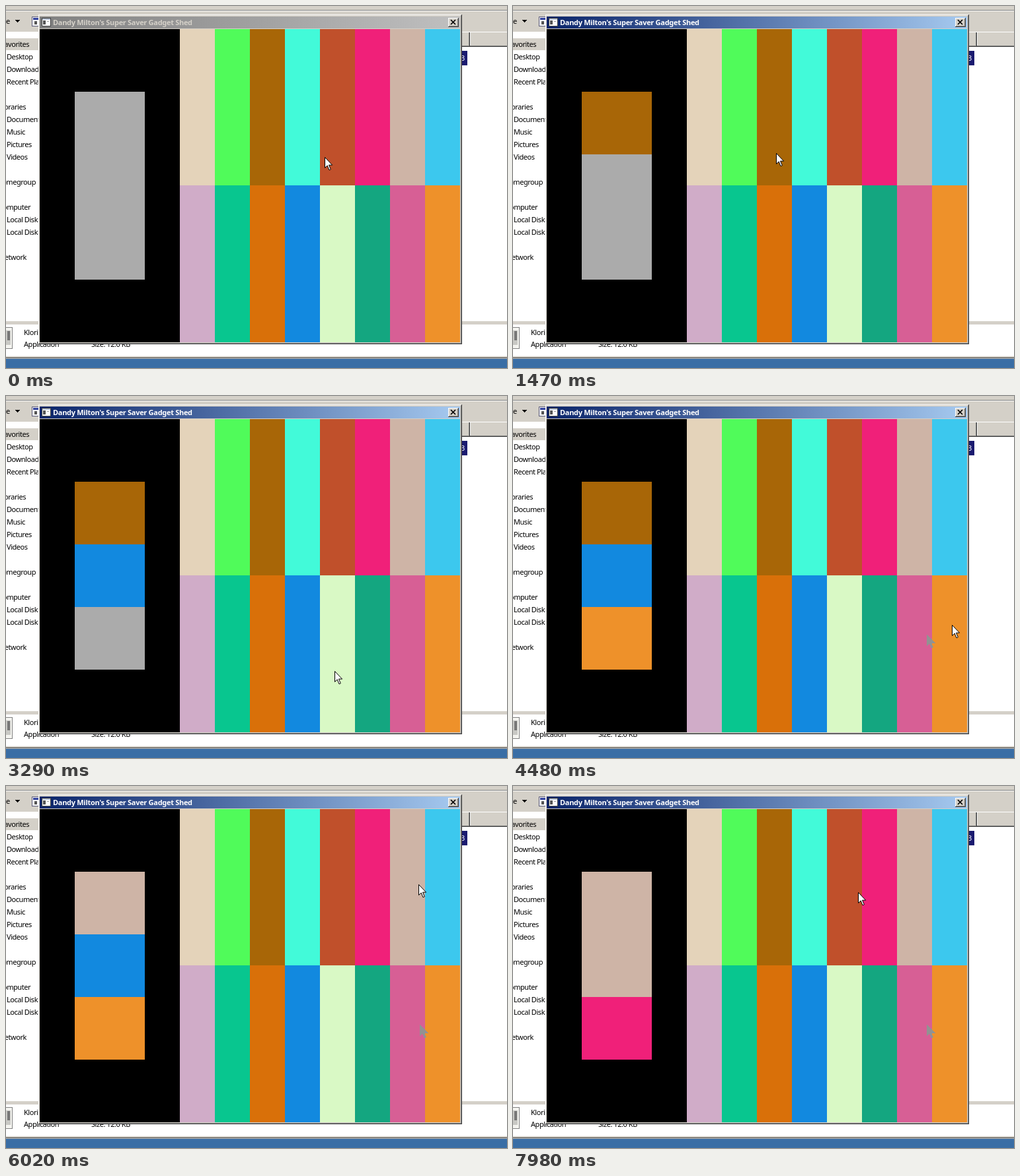
An HTML page for the animation above (8 s loop, 758 px wide and 549 px high).

```html
<!DOCTYPE html>
<html lang="en">
<head>
<meta charset="utf-8">
<title>Colour picker</title>
<style>
html, body { margin: 0; width: 100%; height: 100%; overflow: hidden; background: #fff; }
svg { display: block; shape-rendering: crispEdges; }
text { font: 11px "Noto Sans", sans-serif; letter-spacing: -.45px; fill: #000; white-space: pre; }
#title { font-weight: 700; letter-spacing: -.3px; }
</style>
</head>
<body>
<svg width="758" height="549" viewBox="0 0 758 549">
  <defs>
    <linearGradient id="idle"><stop stop-color="#808080"/><stop offset="1" stop-color="#c0c0c0"/></linearGradient>
    <linearGradient id="active"><stop stop-color="#0a246a"/><stop offset="1" stop-color="#a6caf0"/></linearGradient>
    <path id="arrow" d="M.5 .5V16.5L4.2 13L7 19.8L9.3 18.8L6.5 12.2H11.6Z"/>
  </defs>
  <g id="desktop"></g>
  <g id="window"></g>
  <g id="blocks"></g>
  <use id="ghost" href="#arrow" x="626" y="362" fill="#929292" stroke="#929292"/>
  <use id="cursor" href="#arrow" fill="#fff" stroke="#000" shape-rendering="auto"/>
</svg>
<script>
const LOOP = 8000, STEP = 70;
const FACE = '#d4d0c8', SHADOW = '#808080', DARK = '#404040', EMPTY = '#ababab';
const COLORS = [
  '#e4d3ba', '#50fb5a', '#a86607', '#42fad9', '#c0502b', '#f02079', '#ceb4a6', '#3cc8ee',
  '#d0acc8', '#08c68f', '#d97009', '#1289df', '#d9f9c5', '#14a680', '#d75f95', '#ee912a'
];
const START = [482, 229];
// start time, number of steps, end point, optional x of the bend
const MOVES = [
  [630, 4, 398, 223],
  [1820, 7, 430, 431, 388],
  [2940, 3, 478, 425],
  [3220, 10, 664, 347],
  [4760, 9, 624, 149, 608],
  [7070, 4, 558, 153],
  [7840, 3, 522, 161]
];
// time, row, colour index
const PICKS = [[1470, 0, 2], [2730, 1, 11], [4480, 2, 15], [6020, 0, 6], [6370, 1, 6], [7490, 2, 5]];
const ACTIVE_AT = 1470, GHOST_AT = 3710;

const $ = id => document.getElementById(id);

function add(parent, tag, attrs, content) {
  const el = document.createElementNS('http://www.w3.org/2000/svg', tag);
  for (const key in attrs) el.setAttribute(key, attrs[key]);
  if (content) el.textContent = content;
  return parent.appendChild(el);
}
const rect = (g, x, y, width, height, fill) => add(g, 'rect', { x, y, width, height, fill });
const label = (g, x, y, content, attrs) => add(g, 'text', { x, y, ...attrs }, content);

function bevel(g, x, y, w, h) {
  rect(g, x, y, w, h, DARK);
  rect(g, x, y, w - 1, h - 1, '#fff');
  rect(g, x + 1, y + 1, w - 2, h - 2, SHADOW);
  rect(g, x + 1, y + 1, w - 3, h - 3, FACE);
}

function drawDesktop(g) {
  rect(g, 0, 0, 758, 549, '#fff');
  rect(g, 0, 0, 758, 39, FACE);
  rect(g, 0, 6, 758, 1, SHADOW);
  rect(g, 0, 7, 758, 1, '#fff');
  label(g, 0, 27, 'e');
  add(g, 'path', { d: 'M14 21h7l-3.5 4z' });
  rect(g, 39, 16, 10, 15, '#5a5a78');
  rect(g, 40, 17, 9, 13, '#fff');
  rect(g, 41, 18, 8, 3, '#31419c');
  rect(g, 43, 23, 4, 5, '#555');

  rect(g, 690, 39, 68, 23, FACE);
  rect(g, 690, 39, 68, 1, '#fff');
  rect(g, 690, 61, 68, 1, DARK);
  rect(g, 690, 60, 68, 1, SHADOW);
  rect(g, 700, 40, 1, 21, SHADOW);
  rect(g, 701, 40, 1, 22, DARK);
  rect(g, 702, 40, 1, 20, '#fff');
  rect(g, 688, 68, 10, 22, '#1b1b70');
  label(g, 688, 83, '3', { style: 'fill:#fff' });

  rect(g, 0, 49, 49, 18, FACE);
  const heads = [[62, 35, 'Favorites'], [157, 30, 'Libraries'], [271, 45, 'Homegroup'], [309, 37, 'Computer'], [385, 31, 'Network']];
  for (const [y, x, name] of heads) label(g, x, y, name, { 'text-anchor': 'end' });
  const list = (y, names) => names.forEach((name, i) => label(g, 1, y + 19 * i, name));
  list(81, ['Desktop', 'Downloads', 'Recent Places']);
  list(176, ['Documents', 'Music', 'Pictures', 'Videos']);
  list(328, ['Local Disk (C:)', 'Local Disk (D:)']);

  rect(g, 0, 478, 758, 5, FACE);
  rect(g, -8, 487, 18, 33, SHADOW);
  rect(g, -8, 488, 17, 31, '#f4f4f0');
  rect(g, 0, 492, 7, 22, '#c8c8c4');
  rect(g, 2, 493, 4, 14, '#777');
  label(g, 27, 499, 'Klorimat');
  label(g, 27, 517, 'Application');
  label(g, 129, 517, 'Size: 12.0 KB');
  rect(g, 0, 531, 758, 4, FACE);
  rect(g, 0, 533, 758, 1, DARK);
  rect(g, 0, 535, 758, 14, '#3a6ea5');
}

function drawWindow(g) {
  bevel(g, 49, 13, 641, 500);
  rect(g, 51, 16, 636, 18, 'url(#idle)').id = 'bar';
  rect(g, 54, 18, 14, 13, DARK);
  rect(g, 55, 19, 12, 11, '#fff');
  rect(g, 55, 19, 12, 2, '#b8c4d8');
  rect(g, 56, 22, 4, 6, '#555');
  rect(g, 62, 23, 3, 1, '#999');
  label(g, 71, 29, "Dandy Milton's Super Saver Gadget Shed").id = 'title';
  bevel(g, 669, 18, 16, 14);
  add(g, 'path', { d: 'M673 21l7 7M680 21l-7 7', stroke: '#000', 'stroke-width': 1.7, 'shape-rendering': 'auto' });
  rect(g, 51, 35, 636, 475, '#000');
  COLORS.forEach((color, i) => {
    const low = i > 7;
    rect(g, 263 + 53 * (i % 8), low ? 272 : 35, 53, low ? 238 : 237, color);
  });
}

drawDesktop($('desktop'));
drawWindow($('window'));
const blocks = [0, 1, 2].map(i => rect($('blocks'), 104, 130 + 95 * i, 106, 95, EMPTY));

function cursorAt(t) {
  let [x, y] = START;
  for (const [begin, count, endX, endY, bend = (x + endX) / 2] of MOVES) {
    if (t < begin) break;
    const p = Math.min(1, (Math.floor((t - begin) / STEP) + 1) / count);
    const e = p * p * (3 - 2 * p);
    x = x * (1 - e) ** 2 + 2 * bend * e * (1 - e) + endX * e * e;
    y += (endY - y) * e;
  }
  return [Math.round(x), Math.round(y)];
}

function render(t) {
  const [x, y] = cursorAt(t);
  $('cursor').setAttribute('x', x);
  $('cursor').setAttribute('y', y);

  const fills = [EMPTY, EMPTY, EMPTY];
  for (const [at, row, color] of PICKS) if (t >= at) fills[row] = COLORS[color];
  blocks.forEach((block, i) => block.setAttribute('fill', fills[i]));

  const active = t >= ACTIVE_AT;
  $('bar').setAttribute('fill', active ? 'url(#active)' : 'url(#idle)');
  $('title').style.fill = active ? '#fff' : FACE;
  $('ghost').style.display = t >= GHOST_AT ? '' : 'none';
}

const origin = performance.now();
function tick() {
  render((performance.now() - origin) % LOOP);
  requestAnimationFrame(tick);
}
tick();
</script>
</body>
</html>
```
